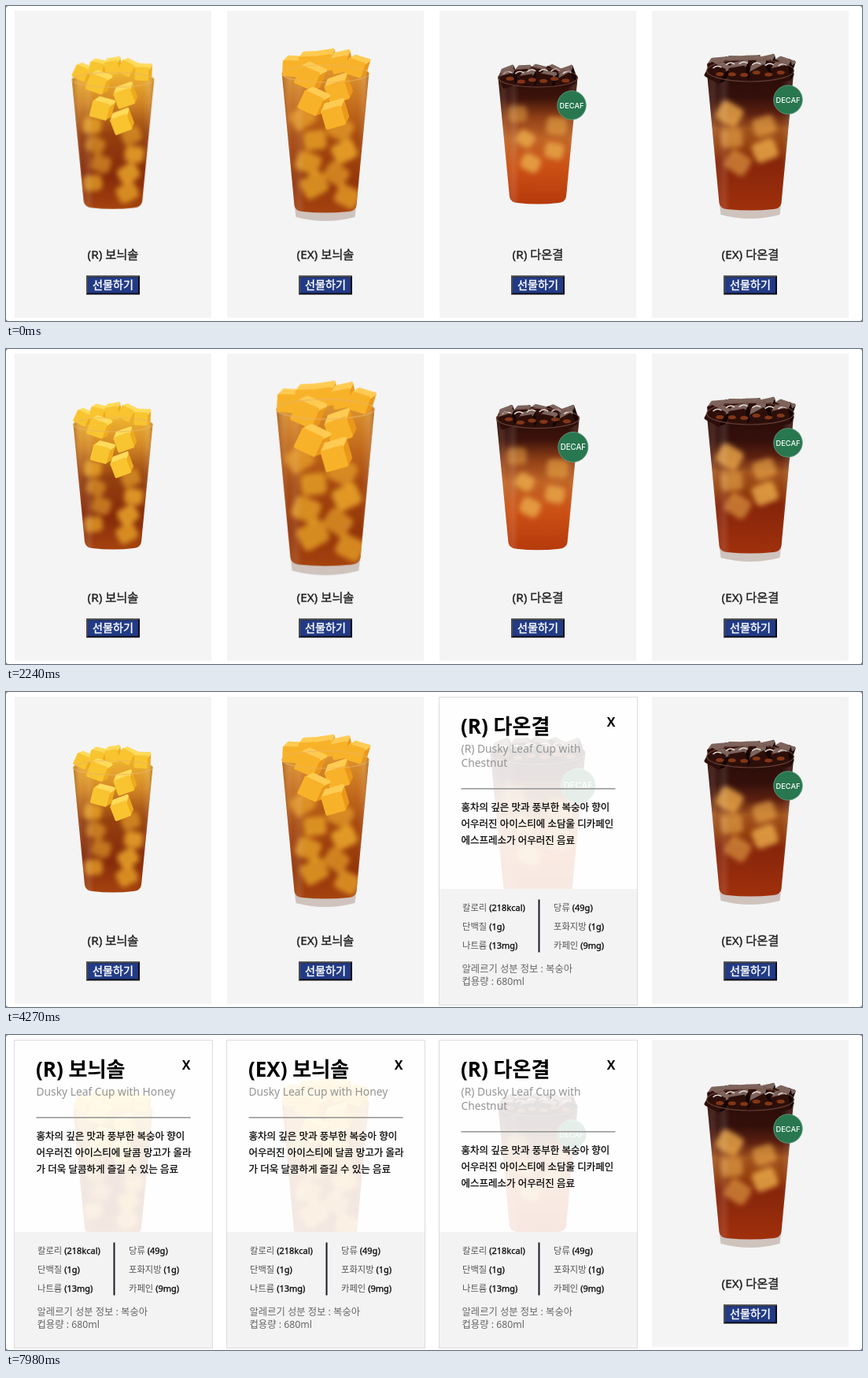
Recreate the animation shown at these times as an HTML page. Size 1088 by 400 pixels, loop 8 s.

```html
<!DOCTYPE html>
<html lang="ko">
<head>
<meta charset="utf-8">
<title>Drink cards</title>
<style>
  html, body { margin: 0; width: 100%; height: 100%; overflow: hidden; background: #666; }
  svg { display: block; width: 1088px; height: 400px; border-radius: 3px; background: #fff; }
  text { font-family: "Noto Sans", "Noto Sans CJK KR", "Noto Sans CJK", sans-serif; }
  .name, .gift, .decaf, .close { text-anchor: middle; }
  .name { font-size: 15.3px; fill: #222; stroke: #222; stroke-width: .4px; }
  .gift { font-size: 14.1px; fill: #fff; stroke: #fff; stroke-width: .4px; }
  .decaf { font: 500 9.3px Inter, sans-serif; fill: #fff; }
  .title { font-size: 26px; font-weight: 700; }
  .close { font-size: 16px; font-weight: 700; }
  .sub { font-size: 13.8px; fill: #949494; }
  .body { font-size: 12.5px; stroke: #000; stroke-width: .25px; }
  .fact { font-size: 11.3px; font-weight: 300; fill: #555; }
  .fact tspan { font-size: 11px; font-weight: 500; fill: #111; stroke: #111; stroke-width: .35px; }
  .note { font-size: 12.3px; font-weight: 300; fill: #666; }
  .zoom { transform: scale(1); animation: 8s ease infinite; }
  .panel { animation: 8s step-end infinite; }
</style>
</head>
<body>
<svg id="stage" viewBox="0 0 1088 400" xmlns="http://www.w3.org/2000/svg"></svg>
<script>
const LOOP = 8000, FADE = 300;

// Hovering a card enlarges its cup; times in ms.
const hover = (start, end) => [[start, 1], [start + FADE, 1.2], [end, 1.2], [end + FADE, 1]];

// Cup sizes are half widths and heights measured from the zoom centre.
const regular = { rim: 50.5, base: 36, foot: 0, cube: 21 };
const extra = { rim: 55.3, base: 39.5, foot: 10, cube: 27 };
const mango = { rise: 17, glow: '#f3b02c', rimColor: '#e8b565', well: '#e2a136' };
const coffee = { rise: 6, glow: '#e9a648', rimColor: '#7a4f45', well: '#32110c', ice: ['#2d0f0a', '#7d645c', '#150605'] };

const mangoBody = ['홍차의 깊은 맛과 풍부한 복숭아 향이', '어우러진 아이스티에 달콤 망고가 올라', '가 더욱 달콤하게 즐길 수 있는 음료'];
const cards = [
  {
    name: '(R) 보늬솔', sub: ['Dusky Leaf Cup with Honey'], body: mangoBody,
    scale: [[0, 1.035], [140, 1], ...hover(450, 1235), ...hover(7190, 7650)], opens: 7650,
    drink: {
      ...regular, ...mango, rimY: -65, rimH: 9, baseY: 93, fruit: ['#f8c430', '#ffdb5c', '#eeaa1e'],
      liquid: ['#efb431', '#d28624 22%', '#96400f 45%', '#84290a 75%', '#a5430f']
    }
  },
  {
    name: '(EX) 보늬솔', sub: ['Dusky Leaf Cup with Honey'], body: mangoBody,
    scale: [...hover(20, 420), ...hover(1265, 2172), ...hover(5235, 5935)], opens: 5935,
    drink: {
      ...extra, ...mango, rimY: -75, rimH: 11, baseY: 101, fruit: ['#f8b229', '#ffcb52', '#ea981b'],
      liquid: ['#e09a30', '#c7701f 25%', '#a5480f 50%', '#93350a 80%', '#a5430f']
    }
  },
  {
    name: '(R) 다온결', sub: ['(R) Dusky Leaf Cup with', 'Chestnut'],
    body: ['홍차의 깊은 맛과 풍부한 복숭아 향이', '어우러진 아이스티에 소담울 디카페인', '에스프레소가 어우러진 음료'],
    scale: [...hover(2192, 3110), ...hover(3695, 4255)], opens: 4255,
    drink: {
      ...regular, ...coffee, rimY: -70, rimH: 12, baseY: 90, badge: [43, -35],
      liquid: ['#1f0906', '#3d130b 22%', '#8f3f17 36%', '#c06426 52%', '#cb5115 72%', '#b63a0c']
    }
  },
  {
    name: '(EX) 다온결', scale: hover(3135, 3660),
    drink: {
      ...extra, ...coffee, rimY: -79, rimH: 14, baseY: 98, badge: [48, -42],
      liquid: ['#250b08', '#34100b 25%', '#5d2010 36%', '#a2541f 46%', '#94400f 58%', '#86250a 68%', '#a0300c']
    }
  }
];
const facts = [['칼로리', '218kcal'], ['단백질', '1g'], ['나트륨', '13mg'], ['당류', '49g'], ['포화지방', '1g'], ['카페인', '9mg']];

const repeat = (n, make) => Array.from({ length: n }, (_, k) => make(k)).join('');
const text = (cls, x, y, content) => `<text class="${cls}" x="${x}" y="${y}">${content}</text>`;
const rect = (x, y, w, h, fill, more = '') => `<rect x="${x}" y="${y}" width="${w}" height="${h}" fill="${fill}" ${more}/>`;
const percent = ms => `${ms / LOOP * 100}%`;

function seeded(seed) {
  return () => (seed = seed * 16807 % 2147483647) / 2147483647 - .5;
}

function cube(x, y, size, turn, [front, light, dark]) {
  const h = size / 2 - 2, e = h * .55, t = -h * .45;
  const face = (d, fill) => `<path d="${d}Z" fill="${fill}" stroke="${fill}" stroke-width="4" stroke-linejoin="round"/>`;
  return `<g transform="translate(${x} ${y}) rotate(${turn})">` +
    face(`M${e} ${t}L${h} ${-h}V${e}L${e} ${h}`, dark) +
    face(`M${-h} ${t}L${-e} ${-h}H${h}L${e} ${t}`, light) +
    face(`M${-h} ${t}H${e}V${h}H${-h}`, front) + '</g>';
}

// A row of pieces across the rim, arched upwards by `rise`.
function row(d, count, rise, colors, rand) {
  return repeat(count, k => {
    const u = -.74 + 1.48 * k / (count - 1);
    return cube(u * d.rim, d.rimY - rise * (1 - .8 * u * u), d.cube, rand() * 60, colors);
  });
}

function fruitPile(d, rand) {
  const front = repeat(4, k => cube((k % 2 ? 1 : -1) * d.rim * (.34 - .04 * k), d.rimY + 3 + 16 * k,
    d.cube + 6, (k % 2 ? -1 : 1) * 18 + rand() * 14, d.fruit));
  return row(d, 5, d.rise, d.fruit, rand) + front;
}

function icePile(d, rand) {
  const glints = repeat(6, k => {
    const u = k / 2.5 - 1;
    return `<path d="M${u * d.rim * .75 - 6} ${d.rimY - 9 + 4 * u * u + rand() * 5}q5 -5 11 -1" stroke="#e6dcd8" stroke-width="1.4" fill="none"/>
      <ellipse cx="${u * d.rim * .7}" cy="${d.rimY + 3 + rand() * 5}" rx="5" ry="2.5" fill="#a0441c" opacity=".75"/>`;
  });
  return row(d, 5, d.rise, d.ice, rand) + row(d, 4, -2, d.ice, rand) + glints;
}

// Blurred pieces seen through the liquid, staggered left and right.
function submerged(d, rand) {
  const [top, bottom] = d.fruit ? [d.rimY + 58, d.baseY - 18] : [-22, 40];
  const count = d.fruit ? 8 : 5;
  return repeat(count, k => {
    const x = (k % 2 ? 1 : -1) * d.base * .5 + rand() * 16;
    const y = top + (bottom - top) * k / (count - 1);
    const size = d.cube + 3 + rand() * 6;
    return rect(-size / 2, -size / 2, size, size * .85, d.glow,
      `rx="6" opacity="${.65 + rand() * .4}" transform="translate(${x} ${y}) rotate(${rand() * 70})"`);
  });
}

function cupPath({ rim, rimY, rimH, base, baseY }) {
  return `M${-rim} ${rimY}L${-base} ${baseY - 9}Q${-base + 1} ${baseY - 2} ${-base + 10} ${baseY - 1}` +
    `Q0 ${baseY + 2} ${base - 10} ${baseY - 1}Q${base - 1} ${baseY - 2} ${base} ${baseY - 9}` +
    `L${rim} ${rimY}A${rim} ${rimH} 0 0 0 ${-rim} ${rimY}Z`;
}

function drinkArt(d, i) {
  const rand = seeded(71 + i), path = cupPath(d);
  const stops = d.liquid.map((stop, n) => {
    const [color, at = n ? '100%' : '0%'] = stop.split(' ');
    return `<stop offset="${at}" stop-color="${color}"/>`;
  }).join('');
  const ring = `cx="0" cy="${d.rimY}" rx="${d.rim}" ry="${d.rimH}"`;
  const low = d.baseY + d.foot * .6;
  const foot = d.foot ? `<path d="M${-d.base} ${d.baseY - 10}L${2 - d.base} ${low}Q0 ${low + d.foot} ${d.base - 2} ${low}L${d.base} ${d.baseY - 10}Z" fill="#cfc3be"/>` : '';
  const badge = d.badge ? `<g transform="translate(${d.badge})">
    <circle r="18.3" fill="#28774f" stroke="#69a085" stroke-width=".8"/>${text('decaf', 0, 3.5, 'DECAF')}</g>` : '';
  return `<linearGradient id="liquid${i}" x2="0" y2="1">${stops}</linearGradient>
    <clipPath id="cup${i}"><path d="${path}"/></clipPath>
    ${foot}<ellipse ${ring} fill="${d.well}"/>
    <path d="${path}" fill="url(#liquid${i})"/>
    <g clip-path="url(#cup${i})">
      <g filter="url(#blur)">${submerged(d, rand)}</g>
      <path d="${path}" fill="url(#sheen)"/>
    </g>
    ${d.fruit ? fruitPile(d, rand) : icePile(d, rand)}
    <ellipse ${ring} fill="none" stroke="${d.rimColor}" stroke-width="1.2" opacity=".75"/>${badge}`;
}

function panel({ name, sub, body }, i) {
  const x = 270 * i, drop = (sub.length - 1) * 18;
  return `<g class="panel" style="animation-name:open${i}">
    ${rect(x + 10.5, 6.5, 252, 391, '#fff', 'fill-opacity=".88" stroke="#ddd"')}
    ${rect(x + 11, 250, 251, 147, '#f3f3f3')}
    ${text('title', x + 38, 52.5, name)}${text('close', x + 229, 43.5, 'X')}
    ${sub.map((s, n) => text('sub', x + 38.5, 77 + 18 * n, s)).join('')}
    ${rect(x + 38.5, 104 + drop, 196, 1.6, '#999')}
    ${body.map((s, n) => text('body', x + 38.5, 133.2 + drop + 20.8 * n, s)).join('')}
    ${facts.map(([label, amount], n) => text('fact', x + (n < 3 ? 40 : 156), 278 + 24 * (n % 3), `${label} <tspan>(${amount})</tspan>`)).join('')}
    ${rect(x + 136.5, 263.5, 2, 67, '#161a24')}
    ${text('note', x + 39.5, 356, '알레르기 성분 정보 : 복숭아')}${text('note', x + 39.5, 372, '컵용량 : 680ml')}
  </g>`;
}

function cardArt(c, i) {
  const x = 11 + 270 * i, mid = x + 125;
  return `${rect(x, 6, 250, 390, '#f4f4f4')}
    ${text('name', mid, 320.7, c.name)}
    <g transform="translate(${mid - 34} 342.5)">
      ${rect(0, 0, 68, 24, '#0a0a12')}
      <path d="M0 24V0H68l-2 2H2V22Z" fill="#4c4c4c"/>
      ${rect(2, 2, 64, 20, '#223b86')}
    </g>
    ${text('gift', mid, 358.6, '선물하기')}
    <g transform="translate(${mid} 161)"><g class="zoom" style="animation-name:zoom${i}">${drinkArt(c.drink, i)}</g></g>
    ${c.opens ? panel(c, i) : ''}`;
}

function motion(c, i) {
  const steps = c.scale.map(([at, size]) => `${percent(at)} { transform: scale(${size}) }`).join(' ');
  const open = c.opens
    ? `@keyframes open${i} { 0% { visibility: hidden } ${percent(c.opens)}, 100% { visibility: visible } }` : '';
  return `@keyframes zoom${i} { ${steps} } ${open}`;
}

document.getElementById('stage').innerHTML = `<style>${cards.map(motion).join('\n')}</style>
  <filter id="blur" x="-20%" y="-20%" width="140%" height="140%"><feGaussianBlur stdDeviation="3"/></filter>
  <linearGradient id="sheen">
    <stop offset="0" stop-color="#5a1a08" stop-opacity=".35"/>
    <stop offset=".12" stop-color="#fff" stop-opacity=".04"/>
    <stop offset=".2" stop-color="#fff" stop-opacity=".1"/>
    <stop offset=".27" stop-color="#fff" stop-opacity="0"/>
    <stop offset=".86" stop-color="#fff" stop-opacity="0"/>
    <stop offset=".93" stop-color="#fff" stop-opacity=".08"/>
    <stop offset="1" stop-color="#5a1a08" stop-opacity=".35"/>
  </linearGradient>` + cards.map(cardArt).join('');
</script>
</body>
</html>
```
